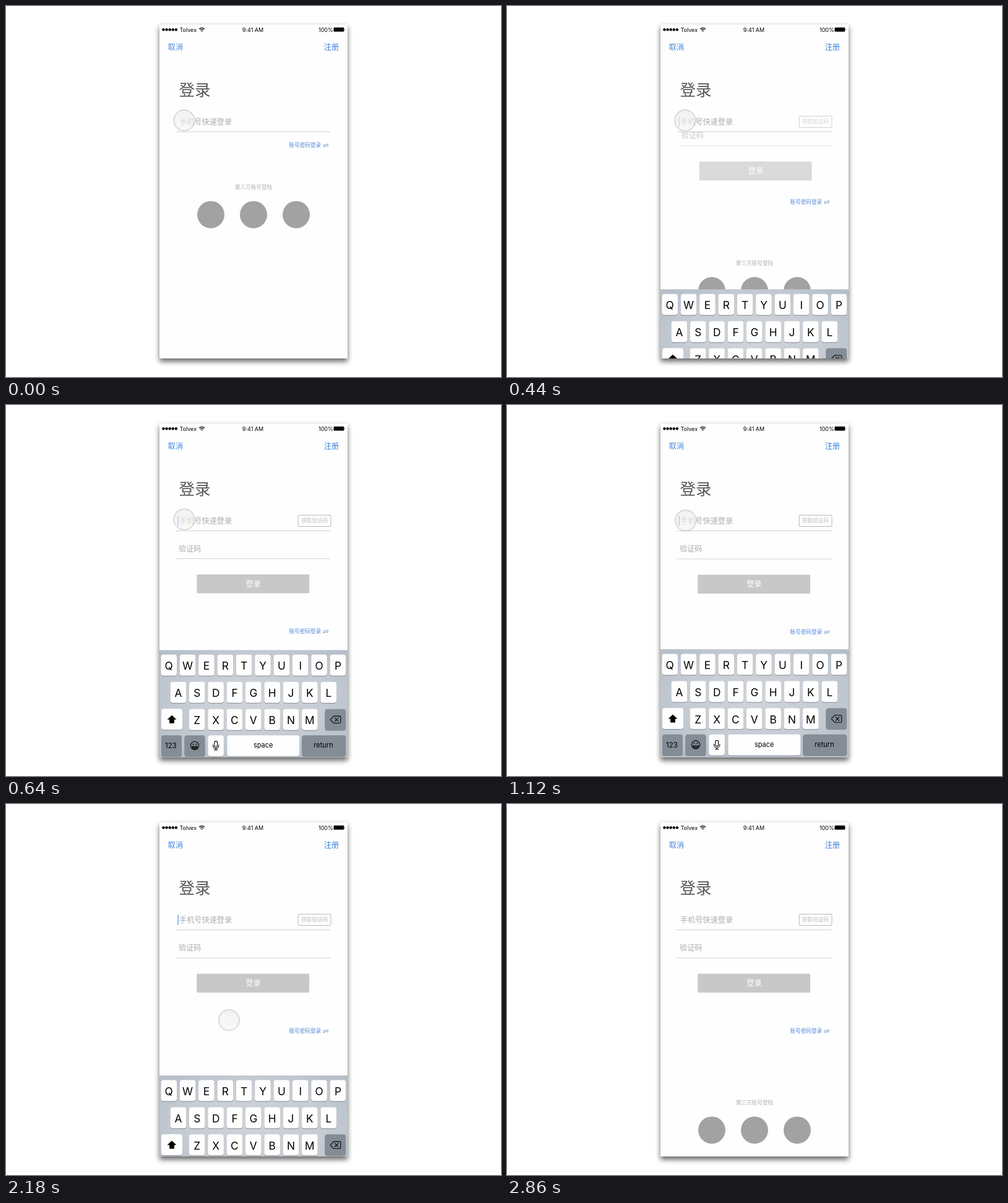
Write an HTML page that moves like this. It is 800 px wide and 600 px high and loops after 4.42 s.

```html
<!DOCTYPE html>
<html lang="zh">
<head>
<meta charset="utf-8">
<title>登录</title>
<style>
  html, body { margin: 0; width: 100%; height: 100%; overflow: hidden; background: #fff; }
  svg { display: block; width: 800px; height: 600px; }
  text { font-family: Inter, Roboto, sans-serif; }
  .zh { font-family: "Noto Sans CJK SC", "Noto Sans CJK", sans-serif; }
</style>
</head>
<body>
<svg id="stage" viewBox="0 0 800 600" xmlns="http://www.w3.org/2000/svg"></svg>
<script>
const LOOP = 4420, STEP = 20;
const stage = document.getElementById('stage');

// Text helpers: Chinese text is placed by its vertical middle, Latin by its baseline.
const zh = (x, mid, size, fill, str, extra = '') =>
  `<text class="zh" x="${x}" y="${mid + size * 0.38}" font-size="${size}" fill="${fill}" ${extra}>${str}</text>`;
const latin = (x, y, size, str, extra = '') =>
  `<text x="${x}" y="${y}" font-size="${size}" ${extra}>${str}</text>`;
const rule = y => `<path d="M274.5 ${y}H524.5" stroke="#d2d2d2"/>`;
const MID = 'text-anchor="middle"';

function statusBar() {
  let s = '';
  for (let i = 0; i < 5; i++) s += `<circle cx="${254.5 + i * 5.1}" cy="38.3" r="2.2"/>`;
  s += latin(280.5, 42, 9, 'Tolvex');
  s += `<g fill="none" stroke="#000" stroke-width="1.3">
      <path d="M312.2 37.2a6.2 6.2 0 0 1 8.6 0"/><path d="M314 39.1a3.6 3.6 0 0 1 5 0"/></g>
    <path d="M315.2 40.3a2 2 0 0 1 2.6 0l-1.3 1.5z"/>`;
  s += latin(399, 41.5, 9, '9:41 AM', MID) + latin(505, 42, 9, '100%');
  s += `<rect x="529.5" y="34.8" width="16.8" height="6.8" rx="1.3"/>
    <path d="M547 36.8q1.4 1.4 0 2.8z"/>`;
  return s;
}

function key(x, y, w, dark) {
  return `<rect x="${x}" y="${y + 1}" width="${w}" height="34" rx="4" fill="#858a91"/>
    <rect x="${x}" y="${y}" width="${w}" height="34" rx="4" fill="${dark ? '#848c95' : '#fefefe'}"/>`;
}

function keyboard() {
  const pitch = 30.36;
  let s = '<rect x="248" y="395" width="304" height="176" fill="url(#board)"/>';
  [['QWERTYUIOP', 263.2, 402.5], ['ASDFGHJKL', 278.4, 446.5], ['ZXCVBNM', 308.7, 490.3]]
    .forEach(([row, x0, y]) => [...row].forEach((ch, i) => {
      const x = x0 + i * pitch;
      s += key(x - 12.8, y, 25.6) + latin(x, y + 24.3, 17.3, ch, MID);
    }));
  s += key(251, 490, 34) + key(515.5, 490.3, 33.6, true);
  s += key(251, 532.8, 33, true) + key(288.5, 532.8, 33, true);
  s += key(326.3, 532.8, 25.6) + key(357.3, 532.8, 117) + key(478.3, 532.8, 70.8, true);
  s += latin(266.5, 554, 11.5, '123', MID) + latin(415.7, 553, 11, 'space', MID) +
    latin(513, 553, 11, 'return', MID);
  // Shift arrow
  s += '<path d="M268 500.5l7.5 7h-3.6v6h-7.8v-6h-3.6z"/>';
  s += `<g fill="none" stroke="#000" stroke-width="1.1" stroke-linejoin="round" stroke-linecap="round">
    <path d="M529.5 501.8h9.5q1.8 0 1.8 1.8v7.8q0 1.8-1.8 1.8h-9.5l-5.2-5.7z"/>
    <path d="M531.4 504.7l5.4 5.6m0-5.6l-5.4 5.6"/>
    <circle cx="305" cy="549.5" r="6.6"/>
    <path d="M300.6 551h8.8a4.4 3.8 0 0 1-8.8 0z"/>
    <path d="M301 552.8h8"/>
    <rect x="336.8" y="542.3" width="4.8" height="9.4" rx="2.4"/>
    <path d="M334.6 548.5v1.2a4.6 4.6 0 0 0 9.2 0v-1.2M339.2 554.3v2.4m-2.6 0h5.2"/></g>
    <circle cx="302.6" cy="547.3" r="1"/><circle cx="307.4" cy="547.3" r="1"/>`;
  return s;
}

stage.innerHTML = `
  <defs>
    <clipPath id="screen"><rect x="248" y="30" width="304" height="540"/></clipPath>
    <filter id="blur" x="-10%" y="-10%" width="120%" height="120%"><feGaussianBlur stdDeviation="4"/></filter>
    <radialGradient id="board" cx=".5" cy=".45" r=".62">
      <stop offset="0" stop-color="#cfd4d9"/><stop offset=".6" stop-color="#c6ccd3"/>
      <stop offset="1" stop-color="#b6bfc9"/>
    </radialGradient>
    <linearGradient id="tip" x2="0" y2="1">
      <stop offset="0" stop-color="#ececec"/><stop offset="1" stop-color="#f6f6f6"/>
    </linearGradient>
  </defs>
  <rect x="248" y="34" width="304" height="541" fill="#000" opacity=".6" filter="url(#blur)"/>
  <rect x="248" y="30" width="304" height="540" fill="#fefefe"/>
  <g clip-path="url(#screen)">
    ${statusBar()}
    ${zh(261.8, 66, 12.16, '#4187df', '取消')}
    ${zh(513.8, 66, 12.16, '#3580df', '注册', 'font-weight="500"')}
    ${zh(279.5, 135, 25.5, '#555', '登录')}
    ${zh(280, 187, 12.16, '#acacac', '手机号快速登录')}
    ${rule(203.5)}
    <g id="code">
      <rect x="472.2" y="178.2" width="52.8" height="18.2" rx="1" fill="none" stroke="#b6b6b6"/>
      ${zh(498.5, 187, 8.6, '#bcbcbc', '获取验证码', MID + ' font-weight="500"')}
    </g>
    <g id="form">
      ${zh(279, 232.5, 12.16, '#acacac', '验证码')}
      ${rule(249)}
      <rect x="308.3" y="274.5" width="181.8" height="30.6" rx="1" fill="#c8c8c8"/>
      ${zh(399.5, 289.5, 12.16, '#fff', '登录', MID + ' font-weight="500"')}
    </g>
    <g id="link">
      ${zh(457.5, 225, 8.6, '#5089d8', '账号密码登录', 'font-weight="500"')}
      <path d="M512.5 224.3h8.6l-2.6-2M521 226.5h-8.6l2.6 2" fill="none" stroke="#7d9cc4" stroke-width=".9"/>
    </g>
    <g id="others">
      ${zh(400, 293, 8.6, '#b0b0b0', '第三方账号登陆', MID)}
      ${[331, 400, 469].map(x => `<circle cx="${x}" cy="337.4" r="22" fill="#a2a2a2"/>`).join('')}
    </g>
    <rect id="caret" x="277.3" y="179" width="1.6" height="16.5" fill="#4a90e2"/>
    <g id="keys">${keyboard()}</g>
    <circle id="touch" fill="url(#tip)" fill-opacity=".65" stroke="#000" stroke-opacity=".14" stroke-width="1.8"/>
  </g>`;

const parts = {};
for (const id of ['code', 'form', 'link', 'others', 'caret', 'keys', 'touch'])
  parts[id] = document.getElementById(id);

const span = (t, start, length) => Math.min(1, Math.max(0, (t - start) / length));
const quart = u => u < 0.5 ? 8 * u ** 4 : 1 - 8 * (1 - u) ** 4;
const sine = u => (1 - Math.cos(Math.PI * u)) / 2;
const move = (el, x, y) => el.setAttribute('transform', `translate(${x} ${y})`);
const fade = (el, a) => el.setAttribute('opacity', a);

function draw(t) {
  const open = quart(span(t, 57, 707));
  const hide = span(t, 2100, 325);
  const travel = sine(span(t, 1100, 300));
  const leave = sine(span(t, 2700, 300));

  fade(parts.code, open);
  fade(parts.form, open);
  move(parts.form, 7 * (1 - open), -65 * (1 - open));
  move(parts.link, 0, 142 * open);
  move(parts.others, 0, 190 * open);
  fade(parts.caret, open * (1 - hide));
  move(parts.keys, 0, 179 * (1 - open + hide));

  const pressed = t >= 1960 && t < 1980;
  const touch = parts.touch;
  touch.setAttribute('cx', 288 + 72.4 * travel + 380 * leave);
  touch.setAttribute('cy', 185 + 164.6 * travel - 18 * leave);
  touch.setAttribute('r', pressed ? 16 : 16.8);
  touch.setAttribute('fill-opacity', pressed ? 0.9 : 0.65);
}

const begin = performance.now();
function tick() {
  const t = (performance.now() - begin) % LOOP;
  draw(Math.floor(t / STEP) * STEP);
  requestAnimationFrame(tick);
}
tick();
</script>
</body>
</html>
```
